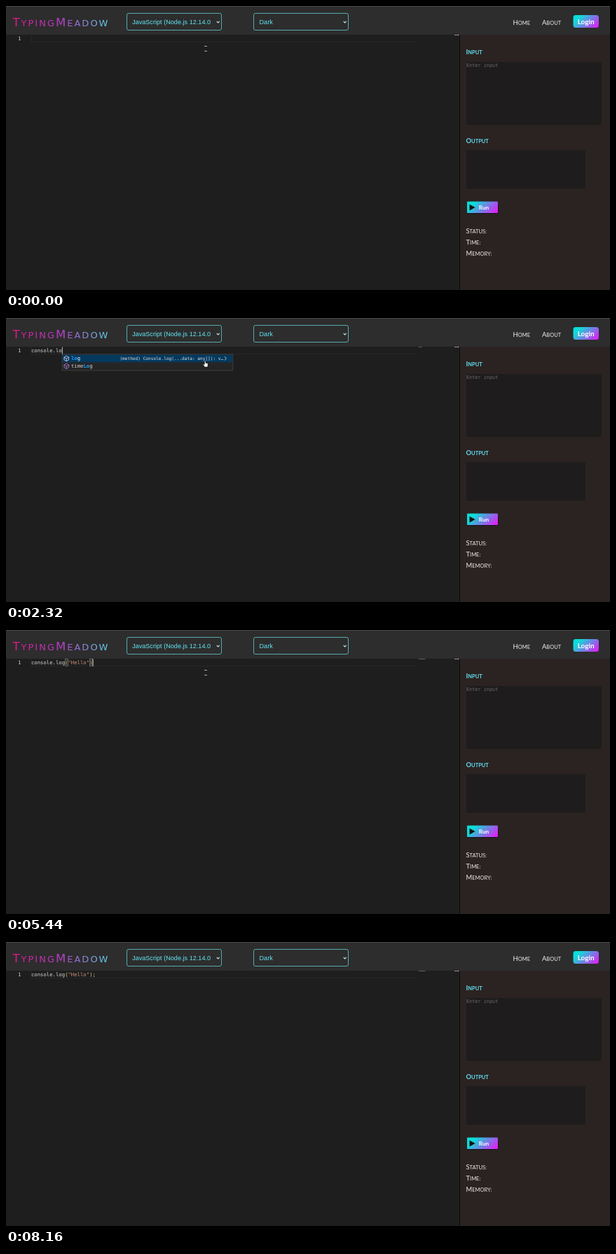
These frames come from a looping animation (862x406 px, 8240 ms). An HTML page:

```html
<!DOCTYPE html>
<html lang="en">
<head>
<meta charset="utf-8">
<title>Code editor</title>
<style>
html, body { margin: 0; width: 100%; height: 100%; overflow: hidden; background: #1e1e1e; }
svg { display: block; width: 862px; height: 406px; }
text { white-space: pre; }
.ui { font-family: "Liberation Sans", Arial, sans-serif; }
.nav { font-family: Lato, "Open Sans", sans-serif; }
.bold { font-weight: 700; }
.mono { font-family: "DejaVu Sans Mono", monospace; font-size: 7.27px; }
.brand { font-family: "DejaVu Sans", sans-serif; font-size: 13px; letter-spacing: 2px; }
.brand .cap { font-size: 16.5px; }
</style>
</head>
<body>
<svg id="stage" viewBox="0 0 862 406">
  <defs id="defs">
    <linearGradient id="brandFill" gradientUnits="userSpaceOnUse" x1="10" y1="0" x2="148" y2="0">
      <stop stop-color="#e0148c"/><stop offset=".5" stop-color="#b13fc4"/><stop offset="1" stop-color="#5fd4ee"/>
    </linearGradient>
  </defs>
  <rect width="862" height="406" fill="#1e1e1e"/>
  <g id="editor"></g>
  <rect x="647" y="41" width="215" height="365" fill="#2b2322"/>
  <path d="M647.5 41V406" stroke="#0c0a0a"/>
  <rect width="862" height="41" fill="#2d2d2d"/>
  <path d="M0 .5H862" stroke="#474747"/>
  <text class="brand" x="9.5" y="29" fill="url(#brandFill)"><tspan class="cap">T</tspan>YPING<tspan class="cap">M</tspan>EADOW</text>
  <g id="panel"></g>
  <g id="popup"></g>
  <g id="mouse"></g>
</svg>
<script>
const NS = 'http://www.w3.org/2000/svg';
const byId = id => document.getElementById(id);
const CHAR = 4.377, LEFT = 36, ROW = 10.78, LOOP = 8240, STEP = 80;

function add(parent, tag, attrs, content) {
  const el = document.createElementNS(NS, tag);
  for (const key in attrs) el.setAttribute(key, attrs[key]);
  if (content !== undefined) el.textContent = content;
  parent.appendChild(el);
  return el;
}
const rect = (g, x, y, width, height, fill, more) => add(g, 'rect', { x, y, width, height, fill, ...more });
const path = (g, d, stroke, more) => add(g, 'path', { d, stroke, fill: 'none', ...more });
const label = (g, x, y, cls, fill, content, more) => add(g, 'text', { x, y, class: cls, fill, ...more }, content);

// First letter large, the others as small capitals
function smallCaps(g, x, y, word, cls, fill) {
  const t = label(g, x, y, 'nav ' + cls, fill, '', { 'font-size': 9.4 });
  add(t, 'tspan', {}, word[0]);
  add(t, 'tspan', { 'font-size': 7.5 }, word.slice(1).toUpperCase());
}

// Rounded button with a diagonal gradient from corner to corner
function button(g, id, x, y, w, h, rx) {
  const cx = x + w / 2, cy = y + h / 2, r = (w + h) / 4;
  const fill = add(byId('defs'), 'linearGradient', { id, gradientUnits: 'userSpaceOnUse', x1: cx - r, y1: cy - r, x2: cx + r, y2: cy + r });
  add(fill, 'stop', { offset: .2, 'stop-color': '#0cdcd8' });
  add(fill, 'stop', { offset: 1, 'stop-color': '#ee12f6' });
  rect(g, x, y, w, h, `url(#${id})`, { rx });
}

function buildPanel(g) {
  [[172.5, 'JavaScript (Node.js 12.14.0', 180], [353.5, 'Dark', 361.5]].forEach(([x, name, tx]) => {
    rect(g, x, 10.5, 135, 24, '#2d2d2d', { rx: 2.5, stroke: '#5cb9be', 'stroke-width': .9 });
    label(g, tx, 25.8, 'ui', '#61e8f4', name, { 'font-size': 9.13 });
    path(g, `M${x + 128.2} 21.8l2 2.1 2-2.1`, '#c5eef0', { 'stroke-width': 1.1 });
  });
  smallCaps(g, 723.5, 27, 'Home', '', '#f2f2f2');
  smallCaps(g, 765, 27, 'About', '', '#f2f2f2');
  button(g, 'loginFill', 809.5, 13, 36.5, 18, 3.5);
  label(g, 827.7, 25.7, 'nav bold', '#fff', 'Login', { 'font-size': 10, 'text-anchor': 'middle' });

  smallCaps(g, 656.5, 69, 'Input', 'bold', '#61dcec');
  rect(g, 657, 80, 193, 90, '#1f1c1d');
  label(g, 657, 86.8, 'mono', '#706c6d', 'Enter input', { style: 'font-size:6.85px' });
  smallCaps(g, 656.5, 196, 'Output', 'bold', '#61dcec');
  rect(g, 657, 206, 170, 55, '#1f1c1d', { rx: 1 });
  rect(g, 658.5, 280, 44, 17, '#111', { rx: 1 });
  button(g, 'runFill', 658, 279.5, 44, 16.5, 1);
  path(g, 'M661.5 283.5V292.5L669.5 288Z', 'none', { fill: '#111' });
  label(g, 674.8, 291.2, 'nav bold', '#fff', 'Run', { 'font-size': 8.2 });
  [['Status:', 325], ['Time:', 341], ['Memory:', 356.5]].forEach(([word, y]) => smallCaps(g, 656.5, y, word, '', '#eee'));
}

// [time, typed text, caret column, suggestion list]
const names = 'confirm console const continue Comment CompositionEvent ConstantSourceNode ConvolverNode CountQueuingStrategy crossOriginIsolated close closed'.split(' ');
const methods = 'assert clear count countReset debug dir dirxml error group groupCollapsed groupEnd info'.split(' ');
const con = 'confirm console const continue ConstantSourceNode ConvolverNode CountQueuingStrategy'.split(' ');
const cons = 'console const ConstantSourceNode'.split(' ');
const steps = [
  [0, '', 0], [800, 'c', 1, names], [960, 'co', 2, names], [1120, 'con', 3, con],
  [1280, 'cons', 4, cons], [1440, 'conso', 5, ['console']], [1600, 'consol', 6, ['console']],
  [1760, 'console', 7, ['console']], [1920, 'console.', 8, methods],
  [2160, 'console.l', 9, ['log', 'timeLog', 'clear']], [2320, 'console.lo', 10, ['log', 'timeLog']],
  [2480, 'console.log', 11, ['log', 'timeLog']], [2880, 'console.log()', 12],
  [3360, 'console.log("")', 13], [3760, 'console.log("H")', 14], [4000, 'console.log("He")', 15],
  [4240, 'console.log("Hel")', 16], [4480, 'console.log("Hell")', 17], [4640, 'console.log("Hello")', 18],
  [5200, 'console.log("Hello")', 19], [5440, 'console.log("Hello")', 20], [5760, 'console.log("Hello");', 21]
];
const details = {
  confirm: 'function confirm(message?: string): boole…',
  console: 'var console: Console',
  assert: '(method) Console.assert(condition?: boo…',
  log: '(method) Console.log(...data: any[]): v…'
};
const keywords = ['const', 'continue'];
const calls = ['confirm', 'close', 'log', 'timeLog', ...methods];

function drawEditor(g, code, col, t) {
  g.replaceChildren();
  path(g, 'M36.5 41V51.5H585', '#2a2a2a', { 'stroke-width': .9 });
  label(g, 17, 49.3, 'mono', '#d0d0d0', '1');
  const open = code.indexOf('('), close = code.lastIndexOf(')');
  if (open >= 0 && col > open && col <= close + 1)
    [open, close].forEach(i => rect(g, LEFT + i * CHAR + .3, 41.5, 4.2, 10, '#202420', { stroke: '#808080', 'stroke-width': .7 }));
  const line = label(g, LEFT, 49.3, 'mono', '#d4d4d4', '');
  (code.match(/"[^"]*"|[()]|[^"()]+/g) || []).forEach(part => {
    const fill = part[0] === '"' ? '#ce9178' : /[()]/.test(part) ? '#e0c268' : '#d4d4d4';
    add(line, 'tspan', { fill }, part);
  });
  if (t >= 800 && t < 6080) rect(g, LEFT + col * CHAR + .1, 41.5, .9, 10.3, '#d8d8d8');
  if (code) rect(g, 589, 41, code.length * .46, .8, '#707070');
  rect(g, 640, 41, 7, 1, '#909090');
  if (t >= 3440 && t < 3680) rect(g, 640.5, 41, 4, 11, '#979797');
}

function drawIcon(g, x, y, name, selected) {
  if (keywords.includes(name)) {
    path(g, `M${x} ${y - 2.8}h4.2m1 0h2.8M${x} ${y}h2.2m1.2 0h3.5M${x} ${y + 2.8}h4m1.2 0h2.8`, '#c5c5c5', { 'stroke-width': .9 });
  } else if (calls.includes(name)) {
    path(g, `M${x + .7} ${y - 1.8}l3.3-2 3.3 2v3.6l-3.3 2-3.3-2zl3.3 2 3.3-2M${x + 4} ${y + .2}v3.5`, selected ? '#e9e0f5' : '#b180d7', { 'stroke-width': .8 });
  } else {
    path(g, `M${x + 1.5} ${y - 2.5}h-1.3v5h1.3m5 0h1.3v-5h-1.3M${x + 2.2} ${y - .7}l2-1.1 1.8 1v1.7l-2 1.1-1.8-1z`, '#75beff', { 'stroke-width': .8 });
  }
}

// Letters that match the typed word are blue
function drawName(g, x, y, name, typed, selected) {
  const t = label(g, x, y, 'mono', selected ? '#fff' : '#d4d4d4', '');
  const lower = name.toLowerCase();
  const at = lower.indexOf(typed);
  let pos = -1;
  const hits = [...typed].map((ch, i) => {
    if (at >= 0) return at + i;
    const upper = name.indexOf(ch.toUpperCase(), pos + 1);
    return pos = upper > 0 ? upper : lower.indexOf(ch, pos + 1);
  });
  [...name].forEach((ch, i) => add(t, 'tspan', hits.includes(i) ? { fill: '#18a3ff', 'font-weight': 700 } : {}, ch));
}

function drawPopup(g, list, code, col) {
  g.replaceChildren();
  if (!list) return;
  const x = LEFT + col * CHAR + .5, top = 52, long = list.length === 12;
  const typed = code.split('.').pop();
  rect(g, x, top, 243.5, list.length * ROW + 1.4, '#252526', { stroke: '#454545', 'stroke-width': .8 });
  rect(g, x + .5, top + .5, 242.5, ROW, '#04395e');
  list.forEach((name, i) => {
    const y = top + .6 + ROW * (i + .5);
    drawIcon(g, x + 2, y, name, !i);
    drawName(g, x + 12.7, y + 2.2, name, typed, !i);
  });
  const detail = details[list[0]];
  if (detail) {
    const end = x + (long ? 235 : 230);
    label(g, end, top + 8, 'mono', '#e4e4e4', detail, { 'text-anchor': 'end', style: 'font-size:6.15px' });
    if (!long) path(g, `M${end + 1.7} ${top + 3.2}q4 2.7 0 5.2`, '#ddd', { 'stroke-width': .8 });
  }
  if (long) rect(g, x + 237.8, top + .5, 5.4, 24.5, '#575758');
}

function drawMouse(g, list, col, t) {
  g.replaceChildren();
  if (t >= 6880) return;
  const arrow = (x, y) => path(g, `M${x} ${y}v8l1.9-1.6 1.2 2.8 1.4-.6-1.2-2.7h2.5z`, '#111', { fill: '#fff', 'stroke-width': .6 });
  if (t >= 6400) {
    const rise = Math.max(0, (t - 6640) / 240);
    const y = 55 - 60 * rise;
    if (y < 41) arrow(286, y);
    else path(g, `M284.5 ${y - 3.7}h1.2l.6.5.6-.5h1.2M286.3 ${y - 3.2}v6.6M284.5 ${y + 3.8}h1.2l.6-.5.6.5h1.2`, '#ddd', { 'stroke-width': .8 });
  } else if (!list) {
    path(g, 'M283 57.5h4M283 64.5h4', '#b8b8b8', { 'stroke-width': .9 });
  } else if (list.length === 12 && LEFT + col * CHAR + 238 < 285) {
    arrow(283.5, 60.5);
  } else {
    path(g, 'M283.4 61.2q.8-1 1.5 0v3l2.5.6q1 .3.8 1.4l-.5 3.8h-4.1l-2-3.2q-.2-1.2.9-1l.9.9z', '#111', { fill: '#fff', 'stroke-width': .5 });
  }
}

function draw(time) {
  const t = Math.floor((time % LOOP) / STEP) * STEP;
  if (t === draw.last) return;
  draw.last = t;
  const [, code, col, list] = steps.filter(s => s[0] <= t).pop();
  drawEditor(byId('editor'), code, col, t);
  drawPopup(byId('popup'), list, code, col);
  drawMouse(byId('mouse'), list, col, t);
}

buildPanel(byId('panel'));
const start = performance.now();
function tick() {
  draw(performance.now() - start);
  requestAnimationFrame(tick);
}
tick();
</script>
</body>
</html>
```
